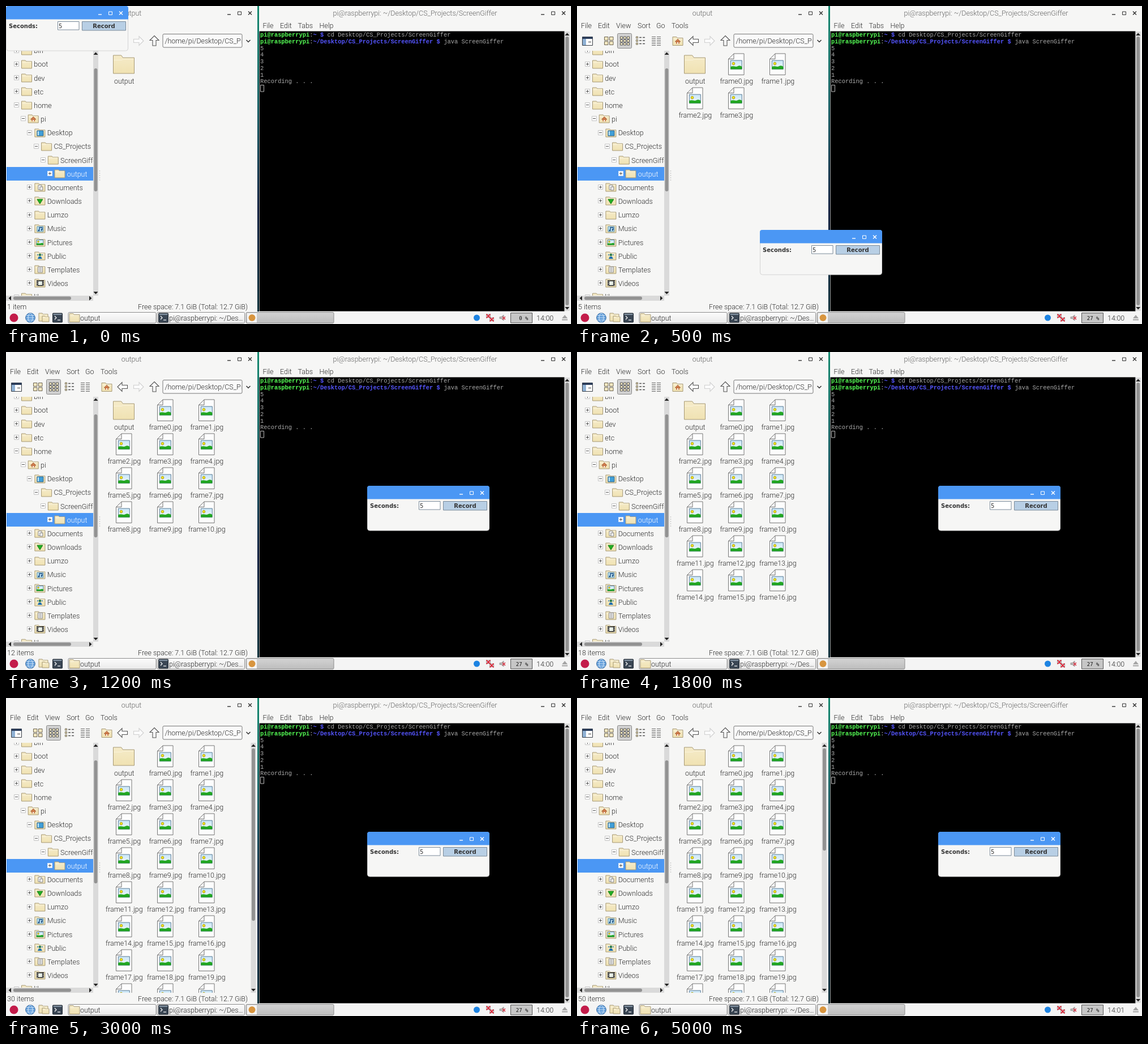
These frames come from a looping animation (998 px wide and 561 px high, 5100 ms). An HTML page with a canvas:

```html
<!DOCTYPE html>
<html lang="en">
<head>
<meta charset="utf-8">
<title>Screen recorder</title>
<style>
html, body { margin: 0; width: 100%; height: 100%; overflow: hidden; background: #f6f6f5; }
canvas { display: block; }
</style>
</head>
<body>
<canvas id="stage" width="998" height="561"></canvas>
<script>
const g = document.getElementById('stage').getContext('2d');
const LOOP = 5100, STEP = 100;
const UI = '300 12.475px Roboto, sans-serif';
const MONO = '10.39px "Liberation Mono", monospace';
const SWING = 'bold 10px "DejaVu Sans", sans-serif';
const INK = '#2c2c2c', BG = '#f6f6f5', BLUE = '#4b97f4';

function rect(x, y, w, h, fill, stroke, r = 0) {
  g.beginPath();
  g.roundRect(x, y, w, h, r);
  if (fill) { g.fillStyle = fill; g.fill(); }
  if (stroke) { g.strokeStyle = stroke; g.lineWidth = 1; g.stroke(); }
}

function path(points, stroke, fill, width = 1, close = !!fill) {
  g.beginPath();
  for (let i = 0; i < points.length; i += 2) g.lineTo(points[i], points[i + 1]);
  if (close) g.closePath();
  if (fill) { g.fillStyle = fill; g.fill(); }
  if (stroke) { g.strokeStyle = stroke; g.lineWidth = width; g.stroke(); }
}

function dot(x, y, r, fill, stroke) {
  g.beginPath();
  g.arc(x, y, r, 0, 7);
  if (fill) { g.fillStyle = fill; g.fill(); }
  if (stroke) { g.strokeStyle = stroke; g.lineWidth = 1; g.stroke(); }
}

function text(s, x, y, color = INK, align = 'left', font = UI) {
  g.font = font;
  g.fillStyle = color;
  g.textAlign = align;
  g.fillText(s, x, y);
}

function clipped(x, y, w, h, draw) {
  g.save();
  g.beginPath();
  g.rect(x, y, w, h);
  g.clip();
  draw();
  g.restore();
}

function shade(y0, y1, ...colors) {
  const s = g.createLinearGradient(0, y0, 0, y1);
  colors.forEach((c, i) => s.addColorStop(i / (colors.length - 1), c));
  return s;
}

function at(x, y, draw) {
  g.save();
  g.translate(x, y);
  draw();
  g.restore();
}

// Icons, each drawn around its own centre
function folder(w = 18, h = 14) {
  const l = -w / 2, t = -h / 2, tab = h * 0.13;
  path([l, h / 2, l, t, l + w * 0.38, t, l + w * 0.46, t + tab, w / 2, t + tab, w / 2, h / 2],
    '#a79974', shade(t, h / 2, '#f5ebc9', '#f0e2b2'));
  path([l + 1, t + tab * 2, l + w * 0.4, t + tab * 2, l + w * 0.48, t + tab * 1.6, w / 2 - 1, t + tab * 1.6],
    '#fbf4dd', null);
}

function house() {
  path([-4.5, 1, 0, -3.5, 4.5, 1], '#9c4a28', '#d88250');
  rect(-3, 0.5, 6, 4, '#c87848');
  rect(-1, 2, 2, 2.5, '#fff');
}

function landscape(w, h) {
  rect(-w / 2, -h / 2, w, h, shade(-h / 2, h / 2, '#c9e6f7', '#f4fafd'), '#5a7a94');
  dot(-w * 0.24, -h * 0.14, h * 0.15, '#f5e51d', '#a89b20');
  g.beginPath();
  g.moveTo(-w / 2, h * 0.2);
  g.bezierCurveTo(-w * 0.25, h * 0.08, -w * 0.05, h * 0.28, w * 0.12, h * 0.16);
  g.quadraticCurveTo(w * 0.32, h * 0.02, w / 2, h * 0.2);
  g.lineTo(w / 2, h / 2);
  g.lineTo(-w / 2, h / 2);
  g.fillStyle = '#22a722';
  g.fill();
}

function page() {
  path([-4, -19, 14, -19, 14, 18.5, -13.5, 18.5, -13.5, -9.5], '#777', '#fdfdfd', 1);
  path([-4, -19, -4, -9.5, -13.5, -9.5], '#777', '#f2f2f2');
  at(0.3, 0.8, () => landscape(20, 15.5));
}

function shell() {
  rect(-8.5, -8, 17, 16, '#3a4654', '#222a33', 1);
  rect(-7.5, -7, 15, 2, '#8494a4');
  path([-5, -3, -2, 0, -5, 3], '#fff', null, 1.2);
  path([0, 4, 5, 4], '#fff', null, 1.2);
}

const badges = {
  home: house,
  desk() {
    rect(-5, -4, 11, 9, '#3f9fd8', '#2b5f86');
    rect(-4, -3, 2, 7, '#cdeafa');
  },
  docs() {
    rect(-3, -4, 6, 8, '#f8f8f8', '#888');
    rect(0, -1, 5, 6, '#eee', '#888');
  },
  down() { path([-5, -3, 5, -3, 0, 5], '#137a13', '#23b023'); },
  music() {
    rect(-5, -4, 11, 9, '#c2e6f5', '#5a8ba5');
    path([-1, 3, -1, -2, 4, -2, 4, 2], '#174a80', null, 1.3);
    dot(-2, 3, 1.4, '#174a80');
    dot(3, 2, 1.4, '#174a80');
  },
  pics() { landscape(12, 9); },
  share() {
    dot(0, -2, 2.3, '#2b7a4a');
    path([-4, 5, -2, 1, 2, 1, 4, 5], null, '#1f6fb0');
    dot(-4, -2, 1, '#1f6fb0');
    dot(4, -2, 1, '#1f6fb0');
  },
  forms() {
    rect(-3.5, -5, 8, 10, '#fafafa', '#888');
    for (let y = -3; y < 5; y += 2) path([-2, y, 3, y], '#999');
  },
  film() {
    rect(-6, -5, 13, 10, '#222');
    rect(-3, -3.5, 7, 7, '#e8f0e8');
    for (let y = -3; y < 5; y += 3) {
      rect(-5.4, y, 1.4, 1.4, '#fff');
      rect(5, y, 1.4, 1.4, '#fff');
    }
  }
};

function winButtons(x, y, color) {
  path([x - 3, y + 2.5, x + 3, y + 2.5], color, null, 1.4);
  rect(x + 15.5, y - 2.5, 6, 5.5, null, color);
  path([x + 34, y - 3, x + 40, y + 3], color, null, 1.4);
  path([x + 40, y - 3, x + 34, y + 3], color, null, 1.4);
}

function triangle(x, y, dx, dy) {
  path([x + dx * 2.5, y + dy * 2.5, x - dx * 2 - dy * 4, y - dy * 2 - dx * 4,
    x - dx * 2 + dy * 4, y - dy * 2 + dx * 4], null, '#222');
}

function vScroll(x, top, bottom, from, to, arrows = '#222') {
  rect(x - 4.5, top, 9, bottom - top, '#dadada');
  triangle(x, top + 5, 0, -1);
  triangle(x, bottom - 5, 0, 1);
  rect(x - 3, from, 6, to - from, '#929292', null, 3);
}

function arrow(x, y, angle, color) {
  at(x, y, () => {
    g.rotate(angle);
    path([-9, 0, -1, -8, -1, -3, 8.5, -3, 8.5, 3, -1, 3, -1, 8], color, '#fbfbfb', 1.1);
  });
}

// Level, name, expander sign, badge
const tree = [
  [0, 'bin', '+'], [0, 'boot', '+'], [0, 'dev', '+'], [0, 'etc', '+'], [0, 'home', '-'],
  [1, 'pi', '-', 'home'], [2, 'Desktop', '-', 'desk'], [3, 'CS_Projects', '-'],
  [4, 'ScreenGiffer', '-'], [5, 'output', '+'], [2, 'Documents', '+', 'docs'],
  [2, 'Downloads', '+', 'down'], [2, 'Lumzo', '+'], [2, 'Music', '+', 'music'],
  [2, 'Pictures', '+', 'pics'], [2, 'Public', '+', 'share'], [2, 'Templates', '+', 'forms'],
  [2, 'Videos', '+', 'film'], [0, 'lib', '+']
];

function drawTree() {
  clipped(0, 79, 154, 432, () => tree.forEach(([level, name, sign, badge], i) => {
    const y = 78.6 + 24.17 * i, row = Math.round(y), dx = 11.7 * level, on = level === 5;
    const mid = row - 0.5, x = Math.round(18 + dx) + 0.5;
    if (on) rect(1, row - 12, 153, 24, BLUE);
    rect(x - 4, mid - 4, 8, 8, '#fff', on ? '#dbe8fa' : '#c4c4c4');
    path([x - 2.5, mid, x + 2.5, mid], '#555');
    if (sign === '+') path([x, mid - 2.5, x, mid + 2.5], '#555');
    at(36.5 + dx, mid + 0.5, () => {
      folder();
      if (badge) badges[badge]();
    });
    text(name, 49.3 + dx, y + 4.6, on ? '#fff' : INK);
  }));
  vScroll(158.5, 79, 511, 110, 327);
  rect(0, 511, 154, 9, '#dadada');
  triangle(7, 515.5, -1, 0);
  triangle(149, 515.5, 1, 0);
  rect(13, 512.5, 102, 6, '#929292', null, 3);
  for (let y = 291; y < 308; y += 4) dot(165.5, y, 0.7, '#aaa');
}

function drawToolbar() {
  rect(9.5, 54.5, 18, 15, '#fff', '#3a3f46');
  rect(9.5, 54.5, 18, 3.5, '#2c3e5c');
  rect(10, 58, 6, 11, '#8fb1d4');
  path([20, 63.5, 25, 63.5], '#555', null, 1.2);
  rect(71.5, 48.5, 25, 26, '#d2d2d2', '#888', 2);
  for (let r = 0; r < 2; r++) for (let c = 0; c < 2; c++)
    rect(48.5 + c * 9, 54.5 + r * 8, 6.5, 6, '#f3e8c2', '#6c6552');
  for (let r = 0; r < 3; r++) {
    for (let c = 0; c < 3; c++) rect(76.5 + c * 6, 54 + r * 5.5, 4, 4, '#f3e8c2', '#555');
    rect(104.5, 54 + r * 5.5, 3, 3, '#f3e8c2', '#6c6552');
    path([110, 55.5 + r * 5.5, 114, 55.5 + r * 5.5], '#555', null, 1.5);
    path([116, 55.5 + r * 5.5, 120, 55.5 + r * 5.5], '#555', null, 1.5);
  }
  for (let y = 54.5; y < 70; y += 3) {
    path([132, y, 139, y], '#666');
    path([141, y, 148, y], '#666');
  }
  at(178, 62, () => { folder(18, 15); house(); });
  arrow(206, 61.5, 0, '#555');
  arrow(234, 61.5, Math.PI, '#d0d0d0');
  arrow(262, 61.5, Math.PI / 2, '#555');
  rect(277, 49.5, 140, 23.5, '#fafafa', '#777', 2);
  clipped(278, 50, 137.5, 22, () => text('/home/pi/Desktop/CS_Projects', 280.5, 66));
  path([424.5, 60, 428, 63.5, 431.5, 60], '#333', null, 1.5);
}

function drawMenu(items) {
  for (const [name, x] of items) text(name, x, 39);
}

function drawFiles(count) {
  const rows = Math.ceil(count / 3);
  clipped(167, 79, 277, 441, () => {
    for (let i = 0; i < count; i++) {
      const x = 208 + 73 * (i % 3), y = 103 + 60 * Math.floor(i / 3);
      at(x, y, i ? page : () => folder(37, 32));
      text(i ? `frame${i - 1}.jpg` : 'output', x + 0.8, y + 33.5, INK, 'center');
    }
  });
  if (rows > 7) vScroll(437, 79, 520, 89, 89 + 422 * 441 / (rows * 60 + 12));
}

function drawManager(count) {
  rect(0, 0, 444, 539, BG);
  text('output', 221.5, 17.3, '#666', 'center');
  winButtons(394, 12.5, '#333');
  drawMenu([['File', 7], ['Edit', 37], ['View', 69], ['Sort', 107], ['Go', 140], ['Tools', 167]]);
  drawToolbar();
  drawTree();
  drawFiles(count);
  text(`${count} item${count > 1 ? 's' : ''}`, 2, 534.7);
  text('Free space: 7.1 GiB (Total: 12.7 GiB)', 427, 534.7, INK, 'right');
}

function prompt(dir, command, y) {
  let x = 449;
  for (const [s, color, weight] of [['pi@raspberrypi', '#55ff55', 'bold '], [':', '#aaa', ''],
    [dir + ' $ ', '#5555ff', 'bold '], [command, '#aaa', '']]) {
    text(s, x, y, color, 'left', weight + MONO);
    x += s.length * 6.238;
  }
}

function drawTerminal() {
  rect(447, 0, 551, 539, BG);
  text('pi@raspberrypi: ~/Desktop/CS_Projects/ScreenGiffer', 722.5, 17.3, '#666', 'center');
  winButtons(948, 12.5, '#333');
  drawMenu([['File', 453.5], ['Edit', 484], ['Tabs', 515.5], ['Help', 553.5]]);
  rect(447.6, 44.4, 538.8, 494, '#000');
  vScroll(991.2, 45, 538, 54, 528);
  const line = i => 54.4 + 11.69 * i;
  prompt('~', 'cd Desktop/CS_Projects/ScreenGiffer', line(0));
  prompt('~/Desktop/CS_Projects/ScreenGiffer', 'java ScreenGiffer', line(1));
  ['5', '4', '3', '2', '1', 'Recording . . .'].forEach((s, i) =>
    text(s, 449, line(i + 2), '#aaa', 'left', MONO));
  rect(449.5, 139.5, 6, 11.5, null, '#bbb');
}

function drawTray(cpu, clock) {
  dot(831.5, 550, 5.5, '#1d83e2');
  for (const [x, y] of [[852, 547], [858, 553]]) {
    rect(x - 3.5, y - 3, 7, 5.5, '#e4e4e4', '#999');
    path([x - 3.5, y - 3.5, x + 3.5, y + 3.5], '#e0182d', null, 1.7);
    path([x + 3.5, y - 3.5, x - 3.5, y + 3.5], '#e0182d', null, 1.7);
  }
  path([872, 548.5, 875, 548.5, 879, 545, 879, 555, 875, 551.5, 872, 551.5], '#999', '#bbb');
  path([877, 548, 882, 553], '#dc3545', null, 1.5);
  path([882, 548, 877, 553], '#dc3545', null, 1.5);
  rect(891.5, 541.5, 38, 17.5, '#c6c6c6', '#555');
  text(cpu + ' %', 922.5, 553.5, '#111', 'right', '9px "DejaVu Sans Mono", monospace');
  text(clock, 937, 554.7);
  path([982, 551, 987, 545, 992, 551], null, '#a4a4a4');
  rect(982, 552.5, 10, 2, '#a4a4a4');
}

function drawTaskbar(cpu, clock) {
  rect(0, 539, 998, 22, '#f4f4f4');
  dot(14, 550, 7.5, '#c31c4a');
  dot(43, 550, 8.3, '#5d9ad8', '#31679f');
  g.beginPath();
  g.ellipse(43, 550, 3.8, 8, 0, 0, 7);
  g.strokeStyle = '#cfe4f8';
  g.stroke();
  for (const y of [546, 550, 554]) path([36, y, 50, y], '#cfe4f8');
  at(66, 549, () => folder(16, 14));
  at(70, 552, () => folder(12, 10));
  at(91, 550, shell);
  rect(110, 540.5, 155, 19, shade(540, 560, '#fdfdfd', '#e9e9e9'), '#8d8d8d', 2);
  at(121, 550, () => folder(18, 15));
  text('output', 131, 554.7);
  rect(267, 540.5, 154.5, 19, shade(540, 560, '#fdfdfd', '#e9e9e9'), '#8d8d8d', 2);
  at(278, 550, shell);
  text('pi@raspberrypi: ~/Des…', 288, 554.7);
  rect(424, 540.5, 155, 19, shade(540, 560, '#d4d4d4', '#bcbcbc'), '#8d8d8d', 2);
  rect(426, 542, 17, 16.5, '#f4f4f4');
  dot(434.5, 550, 6, '#d8953f');
  drawTray(cpu, clock);
}

function drawDialog(x, y) {
  at(x, y, () => {
    rect(0.5, 0.5, 215, 78.5, BG, '#d4d4d4', 4);
    rect(0, 0, 216, 23.5, BLUE, null, [4, 4, 0, 0]);
    winButtons(166, 12.5, '#fff');
    text('Seconds:', 5, 38.8, '#333', 'left', SWING);
    rect(91.5, 27.5, 37.5, 14.5, '#fff', '#7a8a99');
    text('5', 93, 38.5, '#333', 'left', '10px "DejaVu Sans", sans-serif');
    rect(134.5, 27.5, 77, 15.5, '#b8cfe5', '#7a8a99');
    text('Record', 173, 38.8, '#333', 'center', SWING);
  });
}

// Drag of the small window: time, x, y
const drag = [[0, 0, 0], [150, 0, 0], [500, 323, 395], [700, 594, 337], [900, 638, 236]];

function dragAt(t) {
  const i = drag.findIndex(k => k[0] > t);
  if (i < 0) return drag[drag.length - 1].slice(1);
  const a = drag[i - 1], b = drag[i], u = (t - a[0]) / (b[0] - a[0]);
  return [1, 2].map(k => Math.round(a[k] + (b[k] - a[k]) * u));
}

function draw(time) {
  const n = Math.max(1, Math.floor(time / STEP)), t = n * STEP;
  const cpu = t < 300 ? 0 : t === 600 || t === 700 ? 29 : 27;
  rect(0, 0, 998, 561, shade(0, 539, '#168a70', '#125a60', '#0c1a3a', '#0a2c36'));
  drawManager(n);
  drawTerminal();
  drawTaskbar(cpu, t < 3400 ? '14:00' : '14:01');
  drawDialog(...dragAt(t));
}

const start = performance.now();
function tick() {
  draw((performance.now() - start) % LOOP);
  requestAnimationFrame(tick);
}
tick();
</script>
</body>
</html>
```
